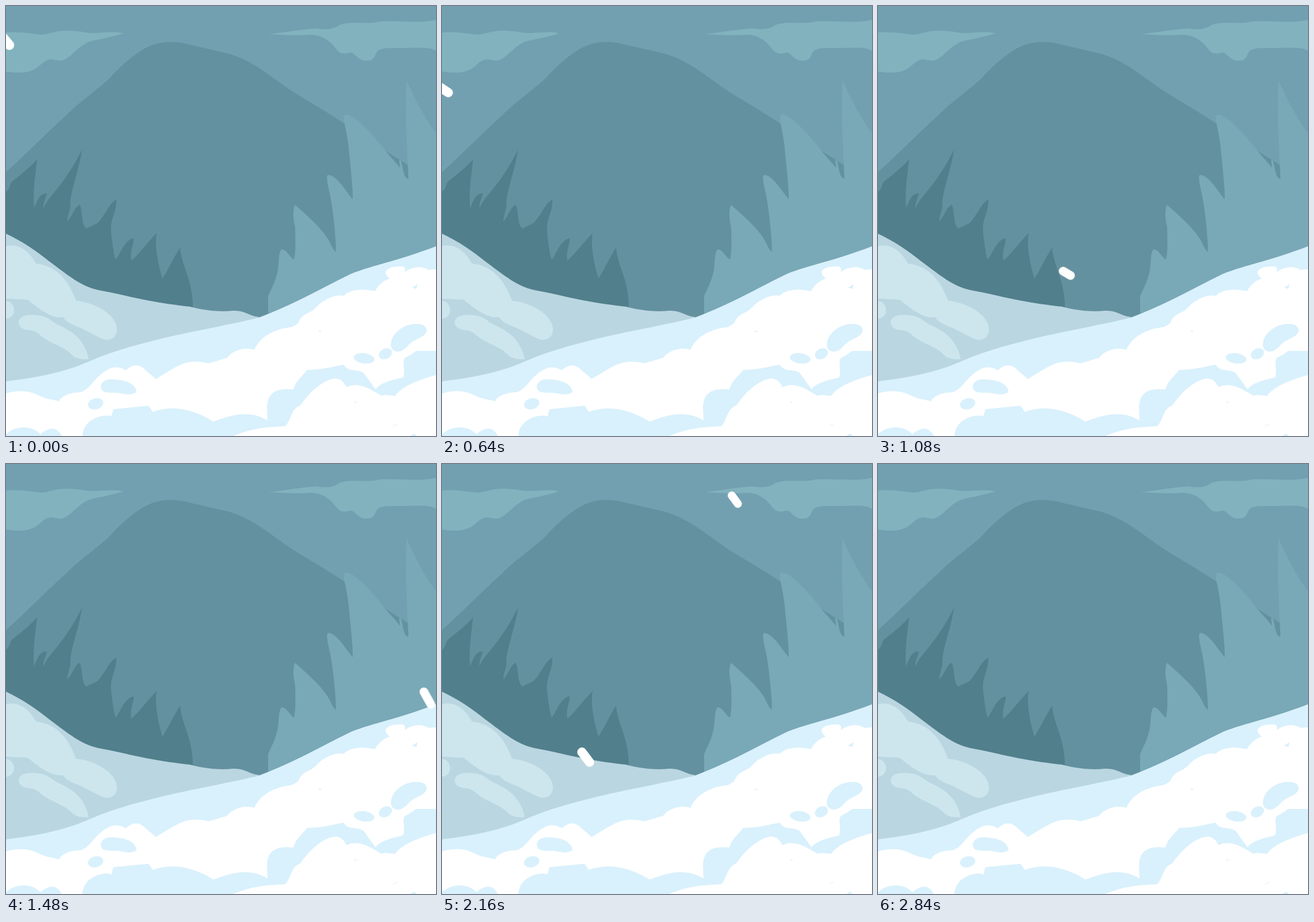
These frames come from a looping animation (748 px wide and 748 px high, 3000 ms). An HTML page:

```html
<!DOCTYPE html>
<html lang="en">
<head>
<meta charset="utf-8">
<title>Snowballs</title>
<style>
html, body { margin: 0; width: 100%; height: 100%; overflow: hidden; background: #72a0b1; }
svg { display: block; width: 100%; height: 100%; }
.cloud { fill: #81b2bd; }
.mountain { fill: #64919f; }
.pines-right { fill: #79a8b7; }
.pines-left { fill: #517f8c; }
.far { fill: #bad6e1; }
.far-light { fill: #cde6ed; }
.near { fill: #d9f1fc; }
.snow { fill: #fff; }

/* Each throw moves in 40 ms steps, then hides when it lands. */
.ball { fill: #fff; visibility: hidden; animation: 3s step-end infinite; }
@keyframes t1 {
  0% { visibility: visible; transform: translate(-1px, 60px) rotate(50deg); animation-timing-function: steps(8); }
  10.66% { visibility: hidden; transform: translate(415px, 556px) rotate(50deg); }
}
@keyframes t2 {
  3.99% { visibility: visible; transform: translate(385px, 21px) rotate(50deg); animation-timing-function: steps(7); }
  13.33% { visibility: hidden; transform: translate(763px, 448px) rotate(50deg); }
}
@keyframes t3 {
  11.99% { visibility: visible; transform: translate(0, 185px) rotate(54deg); animation-timing-function: steps(6); }
  19.99% { visibility: hidden; transform: translate(258px, 545px) rotate(54deg); }
}
@keyframes t4 {
  21.33% { visibility: visible; transform: translate(1px, 144px) rotate(34deg); animation-timing-function: steps(8); }
  31.99% { visibility: hidden; transform: translate(752px, 488px) rotate(26deg); }
}
@keyframes t5 {
  31.99% { visibility: visible; transform: translate(9px, 322.5px) rotate(33deg); animation-timing-function: steps(5); }
  38.66% { visibility: hidden; transform: translate(541.5px, 560px) rotate(29deg); }
}
@keyframes t6 {
  43.99% { visibility: visible; transform: translate(511px, -4px) rotate(61deg); animation-timing-function: steps(5); }
  50.66% { visibility: hidden; transform: translate(788.5px, 510px) rotate(61deg); }
}
@keyframes t7 {
  57.33% { visibility: visible; transform: translate(141.5px, 4px) rotate(80deg); animation-timing-function: steps(6); }
  65.33% { visibility: hidden; transform: translate(255.5px, 550px) rotate(80deg); }
}
@keyframes t8 {
  65.33% { visibility: visible; transform: translate(0, 175px) rotate(53deg); animation-timing-function: steps(6); }
  73.33% { visibility: hidden; transform: translate(300px, 577px) rotate(53deg); }
}
@keyframes t9 {
  70.66% { visibility: visible; transform: translate(453px, -15px) rotate(54deg); animation-timing-function: steps(6); }
  78.66% { visibility: hidden; transform: translate(791px, 447px) rotate(54deg); }
}
@keyframes t10 {
  83.99% { visibility: visible; transform: translate(257px, -5px) rotate(51deg); animation-timing-function: steps(8); }
  94.66% { visibility: hidden; transform: translate(675px, 512px) rotate(51deg); }
}
</style>
</head>
<body>
<svg viewBox="0 0 748 748" preserveAspectRatio="none">
  <rect width="748" height="748" fill="#72a0b1"/>

  <g class="cloud">
    <path d="M0 46C25 44 45 48 62 50C80 48 85 43 105 43C125 42 140 48 155 47C175 46 195 44 203 48C180 55 160 58 145 62C125 70 115 88 100 94C90 97 82 92 76 93C62 96 58 108 45 112C30 118 15 116 0 114Z"/>
    <path d="M458 49C490 45 520 40 540 39C560 42 570 40 580 33C600 25 630 33 650 27C690 25 720 31 748 24V78C735 70 715 73 690 73C670 73 655 72 648 77C640 82 645 95 627 95C610 95 608 80 598 81C585 86 578 80 572 72C565 62 550 50 530 50C505 52 480 50 458 49Z"/>
  </g>

  <path class="mountain" d="M0 289C30 262 80 212 105 190C125 169 160 145 180 126C195 109 220 85 245 72C265 61 295 60 318 67L375 80C420 89 450 115 475 132C500 152 530 166 588 204L660 252L700 277V600H0Z"/>

  <path class="pines-right" d="M456 545V505C462 490 472 475 474 450C475 435 476 420 483 424C490 427 496 440 501 441C505 425 503 400 503 385C498 365 500 350 503 346C520 362 555 390 565 415C568 422 572 427 574 427C574 400 568 350 564 330C558 305 557 295 560 294C575 293 593 325 603 336C604 315 597 260 596 245C593 215 584 195 590 189C605 185 645 232 660 252C668 262 678 272 685 281C687 277 681 268 686 268C691 275 690 300 700 300C698 250 693 180 697 130C710 160 730 198 748 221V560Z"/>

  <path class="pines-left" d="M0 323C8 318 6 308 12 304C30 290 42 280 54 267C52 290 46 320 49 352C54 340 58 325 71 326C70 333 63 345 66 353C68 335 100 316 132 250C128 285 110 325 112 350C108 365 106 372 107 374C113 370 120 348 128 346C134 355 130 380 140 387C150 382 155 380 160 377C175 360 180 342 192 337C193 360 180 370 183 395C185 415 188 435 191 441C200 430 205 408 222 404C223 415 215 425 218 443C235 428 245 412 262 395C258 420 265 450 272 474C282 460 290 440 303 420C304 450 325 475 325 524V560H0Z"/>

  <path class="far" d="M0 396C30 410 55 428 75 444C110 470 130 487 160 494C210 503 240 514 320 523C350 531 375 532 395 530C415 529 425 540 440 541V660H0Z"/>
  <g class="far-light">
    <path d="M0 418C20 412 40 425 52 448C90 452 110 480 122 513C155 515 193 538 193 562C193 580 178 584 165 578L130 560C112 553 105 550 99 541C80 545 55 525 38 511C25 510 10 510 0 509Z"/>
    <path d="M0 513C10 514 14 522 14 529C14 538 8 543 0 544Z"/>
    <path d="M22 549C24 538 40 536 55 538C70 539 75 545 86 552C105 562 135 572 144 614C130 616 120 612 115 607C100 592 85 590 70 580C60 575 55 565 42 564C28 563 22 558 22 549Z"/>
  </g>

  <path class="near" d="M0 653C50 647 100 638 145 618C190 598 240 586 290 574C340 563 400 552 440 542C500 520 550 490 600 466C640 450 680 444 748 418V748H0Z"/>
  <g class="snow">
    <path d="M0 674C20 668 40 668 58 678C75 686 85 684 92 688C98 676 115 672 130 672C150 665 155 640 185 629C195 627 205 631 208 634C220 623 232 622 243 634C250 640 255 643 260 649C285 635 300 622 322 619C340 618 358 622 365 626C378 620 385 612 390 606C405 595 420 595 432 598C440 580 455 570 470 565C480 560 500 558 506 558C510 545 515 538 527 533C540 528 542 518 555 512C570 503 580 503 588 504C595 495 615 490 642 496C648 485 656 478 668 474C655 466 657 452 690 453C695 455 695 459 693 463C705 455 720 450 735 459L748 458V600H600L400 680L0 720Z"/>
    <path d="M748 581C725 585 715 603 694 612C688 620 695 630 691 646C675 650 650 655 643 667L622 638C610 630 595 638 588 624C570 626 560 632 524 633C515 645 505 650 500 667C470 664 454 672 454 700L455 721C430 705 400 707 361 723C340 710 300 690 255 706C245 685 225 680 210 683C190 690 185 702 184 714C165 708 133 722 133 748H97C88 728 70 735 60 745C45 728 15 730 0 745V700L92 688L260 649L432 598L588 504L748 490Z"/>
    <path d="M395 748C420 738 440 733 485 731C495 725 495 700 512 695C525 675 550 650 573 648C583 649 588 654 592 663C612 654 630 664 653 678C662 675 670 678 677 678C690 660 720 650 748 642V748Z"/>
  </g>
  <g class="near">
    <path d="M165 660C168 650 180 648 193 650C210 651 226 658 227 672C215 679 205 674 195 673C180 672 164 676 165 660Z"/>
    <path d="M670 585C672 570 690 554 712 553C728 552 734 560 731 568C725 578 712 578 700 590C690 602 680 604 673 598C669 594 669 590 670 585Z"/>
    <path d="M706 490L716 484L714 492Z"/>
    <ellipse cx="156" cy="692" rx="13.5" ry="9.5" transform="rotate(-15 156 692)"/>
    <ellipse cx="623" cy="613" rx="18" ry="9" transform="rotate(8 623 613)"/>
    <ellipse cx="660" cy="605" rx="12" ry="9" transform="rotate(-28 660 605)"/>
    <ellipse cx="546" cy="566" rx="3" ry="1"/>
    <ellipse cx="608" cy="689" rx="2" ry="1"/>
    <path d="M671 731L684 726L677 730ZM703 748L710 744L715 748Z"/>
  </g>

  <rect class="ball" x="-19" y="-8.5" width="38" height="17" rx="8.5" style="animation-name:t1"/>
  <rect class="ball" x="-20" y="-7.5" width="40" height="15" rx="7.5" style="animation-name:t2"/>
  <rect class="ball" x="-19" y="-8" width="38" height="16" rx="8" style="animation-name:t3"/>
  <rect class="ball" x="-20" y="-8" width="40" height="16" rx="8" style="animation-name:t4"/>
  <rect class="ball" x="-15" y="-7.5" width="30" height="15" rx="7.5" style="animation-name:t5"/>
  <rect class="ball" x="-20" y="-7.5" width="40" height="15" rx="7.5" style="animation-name:t6"/>
  <rect class="ball" x="-21" y="-7" width="42" height="14" rx="7" style="animation-name:t7"/>
  <rect class="ball" x="-19" y="-8" width="38" height="16" rx="8" style="animation-name:t8"/>
  <rect class="ball" x="-16" y="-7" width="32" height="14" rx="7" style="animation-name:t9"/>
  <rect class="ball" x="-20" y="-8" width="40" height="16" rx="8" style="animation-name:t10"/>
</svg>
</body>
</html>
```
